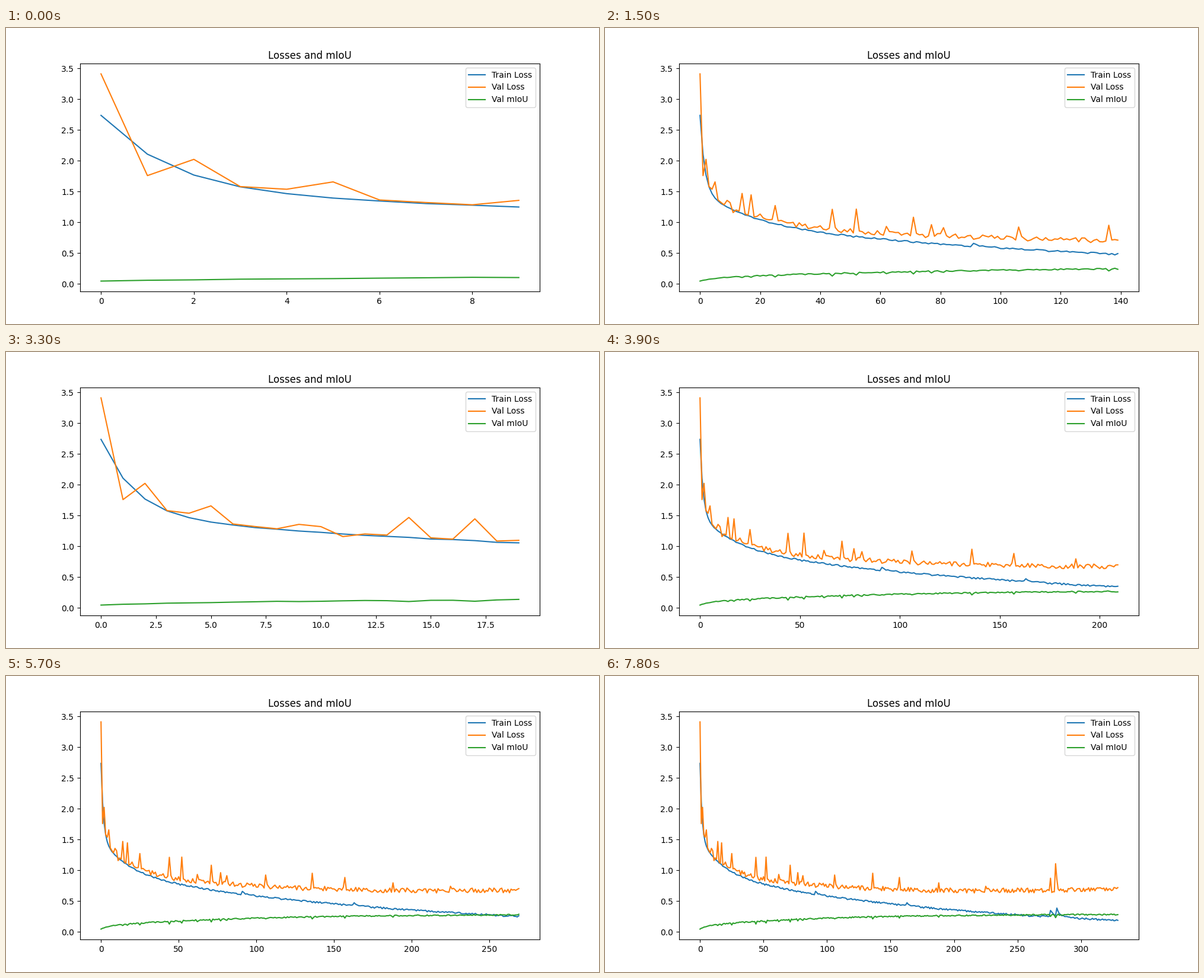
A matplotlib script for the animation above (8000 ms loop, 1000 by 500 pixels).

```python
import matplotlib.pyplot as plt
import numpy as np
from matplotlib.animation import FuncAnimation

EPOCHS = 330
STEP_MS, HOLD = 100, 3      # each plot stays for HOLD steps
STEPS = 80

rng = np.random.default_rng(4)
epoch = np.arange(EPOCHS)
ramp = np.minimum(1, epoch / 30)    # early epochs are nearly free of noise


def decay(height, tau, start=0):
    """Exponential fall that begins at epoch start."""
    age = epoch - start
    return np.where(age >= 0, height * np.exp(-np.maximum(age, 0) / tau), 0)


def noise(low, high):
    return ramp * rng.uniform(low, high, EPOCHS)


# Main jumps of the validation loss above its trend
JUMPS = {0: 0.674, 1: -0.35, 2: 0.25, 4: 0.06, 5: 0.26, 9: 0.1, 10: 0.08, 11: -0.06,
         14: 0.32, 17: 0.315, 20: 0.08, 25: 0.265, 44: 0.35, 52: 0.36, 62: 0.15,
         71: 0.265, 77: 0.19, 81: 0.17, 106: 0.2, 136: 0.215, 157: 0.16, 188: 0.13,
         225: 0.11, 276: 0.17, 280: 0.46, 281: 0.17}
jumps = np.zeros(EPOCHS)
jumps[list(JUMPS)] = list(JUMPS.values())

trend = decay(0.956, 200) + decay(0.56, 17) + decay(1.22, 1.5)
setbacks = decay(0.05, 2, 91) + decay(0.05, 2, 163) + decay(0.11, 2.5, 276) + decay(0.13, 3, 281)

curves = {
    "Train Loss": trend + setbacks + noise(-0.012, 0.016),
    "Val Loss": trend + 0.00155 * epoch + jumps + noise(-0.03, 0.05),
    "Val mIoU": (0.29 - decay(0.19, 95) - decay(0.055, 5)
                 - 0.12 * ramp * jumps + noise(-0.012, 0.008)),
}

# Epoch counts run in alphabetical order: 10, 100, 110, ... 20, 200, ...
counts = sorted(range(10, EPOCHS + 1, 10), key=str)

fig, ax = plt.subplots(figsize=(10, 5), dpi=100)
ax.set_title("Losses and mIoU")
lines = [ax.plot(y, label=name)[0] for name, y in curves.items()]
ax.legend(loc="upper right")


def update(step):
    n = counts[step // HOLD]
    for line, y in zip(lines, curves.values()):
        line.set_data(epoch[:n], y[:n])
    ax.relim()
    ax.autoscale_view()
    return lines


anim = FuncAnimation(fig, update, frames=STEPS, interval=STEP_MS,
                     repeat=True, repeat_delay=0)
plt.show()
```
